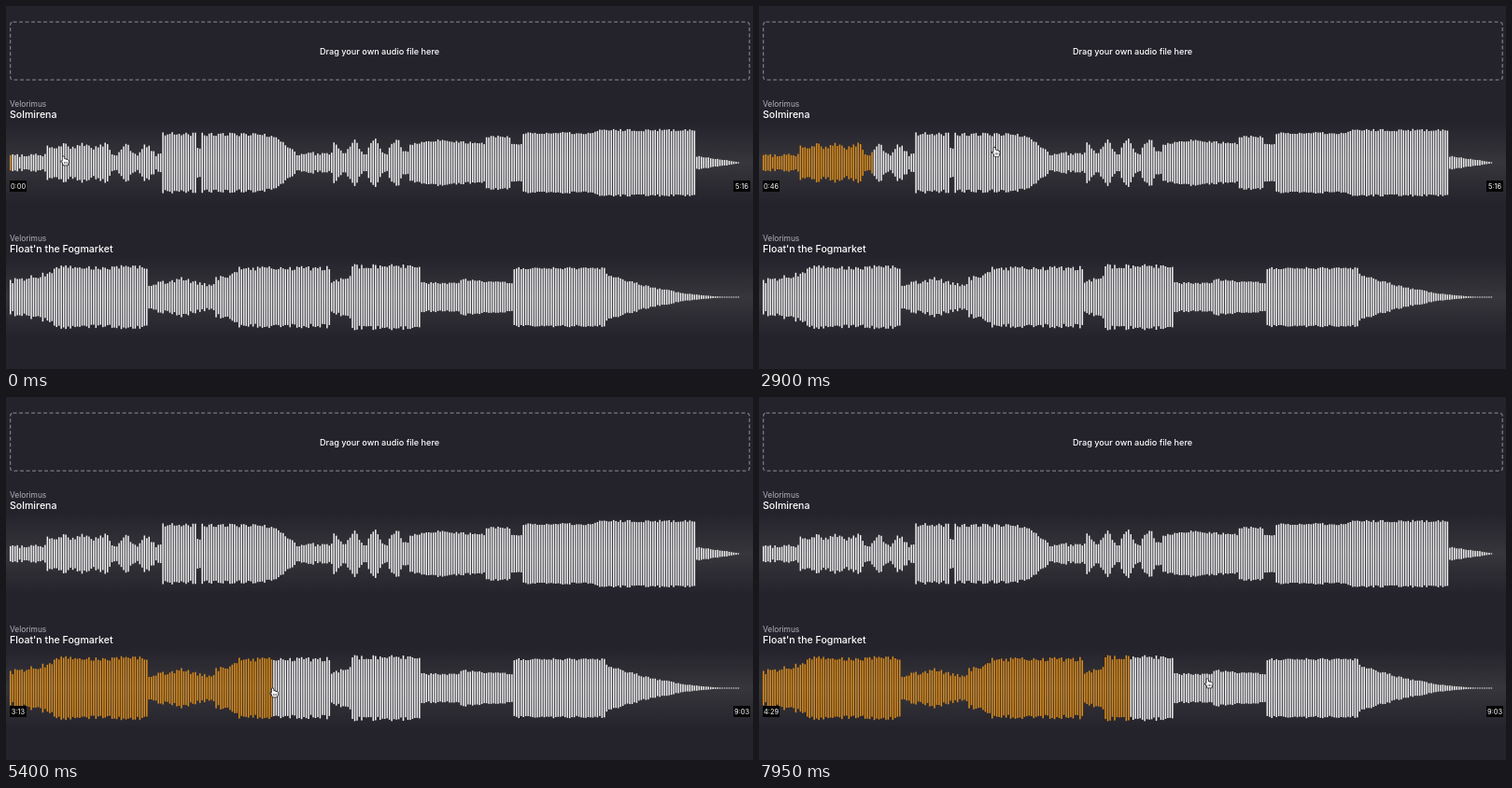
Write an HTML page with a canvas that moves like this. It is 800 px wide and 389 px high and loops after 8 s.

```html
<!DOCTYPE html>
<html lang="en">
<head>
<meta charset="utf-8">
<title>Audio players</title>
<style>
html, body { margin: 0; width: 100%; height: 100%; overflow: hidden; background: #24222b; }
canvas { display: block; width: 800px; height: 389px; }
</style>
</head>
<body>
<canvas id="stage" width="800" height="389"></canvas>
<script>
const ctx = document.getElementById('stage').getContext('2d');
const LOOP = 8000, LEFT = 4, WIDTH = 792, BARS = 320, PITCH = WIDTH / BARS, SOUND_END = 786;
const BG = '#24222b';

// Song sections: end x, half height at start and end, beat swing.
// After the last one the sound fades out from `tail` with the power `fade`.
const tracks = [
  { artist: 'Velorimus', title: 'Solmirena', mid: 168, length: 316, seed: 7, tail: 7, fade: 0.8, sections: [
    [43, 8, 8, 0], [110, 18, 18, 2], [165, 14, 14, 5], [203, 31, 31, 0], [207, 14, 14, 0],
    [285, 31, 30, 0], [309, 29, 13, 0], [349, 9, 11, 0], [432, 17, 17, 7], [466, 20, 25, 0],
    [512, 24, 20, 0], [540, 28, 28, 0], [553, 19, 19, 0], [632, 32, 32, 0], [737, 35, 35, 0]] },
  { artist: 'Velorimus', title: "Float'n the Fogmarket", mid: 312, length: 543, seed: 23, tail: 25, fade: 2, sections: [
    [50, 17, 26, 0], [151, 32, 32, 0], [157, 14, 8, 0], [195, 13, 21, 0], [224, 16, 13, 0],
    [248, 20, 26, 0], [346, 31, 31, 0], [369, 16, 21, 0], [443, 33, 33, 0], [485, 15, 15, 0],
    [542, 19, 15, 0], [641, 31, 31, 0]] }
];

// Pointer path: ms, x, y
const pointer = [
  [550, 63, 166], [1100, 87, 167], [1950, 123, 166], [2800, 253, 156], [3400, 257, 158],
  [3900, 294, 298], [4100, 278, 312], [4600, 287, 317], [5400, 287, 317], [6450, 392, 312],
  [7500, 398, 312], [7900, 448, 308], [8000, 514, 306]
];

// Playback: start ms, track, position in seconds, speed
const seeks = [
  [0, 0, 0.01, 1], [550, 0, 23, 1], [1850, 0, 45.8, 1], [2950, 0, 99.2, 1],
  [4400, 1, 0, 0], [5000, 1, 0.01, 1], [5400, 1, 193, 0.9], [7500, 1, 268.55, 1]
];

const mix = (a, b, k) => a + (b - a) * Math.min(1, Math.max(0, k));

function random(seed) {
  return () => (seed = seed * 16807 % 2147483647) / 2147483647;
}

function envelope({ sections, tail, fade }, x) {
  let start = LEFT;
  for (const [end, from, to, swing] of sections) {
    if (x < end) {
      return mix(from, to, (x - start) / (end - start)) + swing * Math.cos((x - 127) / 22.3 * 2 * Math.PI);
    }
    start = end;
  }
  return tail * Math.max(0, (SOUND_END - x) / (SOUND_END - start)) ** fade;
}

for (const track of tracks) {
  const next = random(track.seed * 9973);
  track.bars = Array.from({ length: BARS }, (_, i) => {
    const x = LEFT + i * PITCH;
    const h = envelope(track, x);
    const spread = Math.min(5, h * 0.45) * (x < 430 ? 1 : 0.5);
    return x > SOUND_END ? 0 : Math.max(0.5, h + (next() - 0.5) * spread);
  });
}

function text(str, x, y, size, color = '#fff', align = 'left', weight = 400) {
  ctx.font = `${weight} ${size}px Inter, sans-serif`;
  ctx.fillStyle = color;
  ctx.textAlign = align;
  ctx.fillText(str, x, y);
}

function timeLabel(seconds, x, mid) {
  const s = Math.floor(seconds);
  ctx.fillStyle = '#050506';
  ctx.fillRect(x, mid + 19, 18, 12);
  text(`${Math.floor(s / 60)}:${String(s % 60).padStart(2, '0')}`, x + 9, mid + 27.5, 7.4, '#fff', 'center');
}

function drawTrack(track, position) {
  const { mid } = track;
  text(track.artist, LEFT, mid - 60.5, 8.4, '#b5b4b9');
  text(track.title, LEFT, mid - 48, 10.6, '#fff', 'left', 500);

  const glow = ctx.createLinearGradient(0, mid - 44, 0, mid + 44);
  glow.addColorStop(0, BG);
  glow.addColorStop(0.5, '#37363b');
  glow.addColorStop(1, BG);
  ctx.fillStyle = glow;
  ctx.fillRect(0, mid - 44, 800, 88);

  const played = position > 0 ? position / track.length * BARS : -1;
  track.bars.forEach((h, i) => {
    ctx.fillStyle = i <= played ? '#dc8d1c' : '#f0f0f1';
    ctx.fillRect(LEFT + i * PITCH, mid - h, 1.5, 2 * h);
  });
  if (position !== null) {
    timeLabel(position, LEFT, mid);
    timeLabel(track.length, 779, mid);
  }
}

const hand = new Path2D('M-2.6-5.2Q-1.5-6-.8-4.8L-.6-2Q.4-2.8 1.1-1.6Q2.2-2.2 2.8-1' +
  'Q4.5-1.3 4.6.4Q4.7 3 3.3 5.2H-1.7Q-3-.1-4.8.8Q-4.4-.5-2.7.7Z');

function drawHand(t) {
  const i = Math.max(1, pointer.findIndex(key => key[0] > t));
  const [a, b] = [pointer[i - 1], pointer[i]];
  const k = (t - a[0]) / (b[0] - a[0]);
  ctx.save();
  ctx.translate(mix(a[1], b[1], k), mix(a[2], b[2], k));
  ctx.scale(0.88, 0.88);
  ctx.lineWidth = 1.5;
  ctx.lineJoin = 'round';
  ctx.strokeStyle = '#111';
  ctx.stroke(hand);
  ctx.fillStyle = '#fff';
  ctx.fill(hand);
  ctx.lineWidth = 0.6;
  ctx.beginPath();
  for (const dx of [-0.6, 1, 2.6]) {
    ctx.moveTo(dx, 1);
    ctx.lineTo(dx, 3.6);
  }
  ctx.stroke();
  ctx.restore();
}

function drawDropZone() {
  ctx.strokeStyle = '#7a797f';
  ctx.lineWidth = 1.3;
  ctx.setLineDash([3.9, 2.6]);
  ctx.beginPath();
  ctx.roundRect(4.6, 17.2, 791.6, 62, 3);
  ctx.stroke();
  ctx.setLineDash([]);
  text('Drag your own audio file here', 400, 52, 9.15, '#fff', 'center', 500);
}

function draw(now) {
  const t = now % LOOP;
  const [start, active, from, speed] = seeks.findLast(seek => seek[0] <= t);
  const position = from + (t - start) / 1000 * speed;
  ctx.fillStyle = BG;
  ctx.fillRect(0, 0, 800, 389);
  drawDropZone();
  tracks.forEach((track, i) => drawTrack(track, i === active ? position : null));
  drawHand(t);
}

function frame() {
  draw(performance.now());
  requestAnimationFrame(frame);
}
frame();
</script>
</body>
</html>
```
